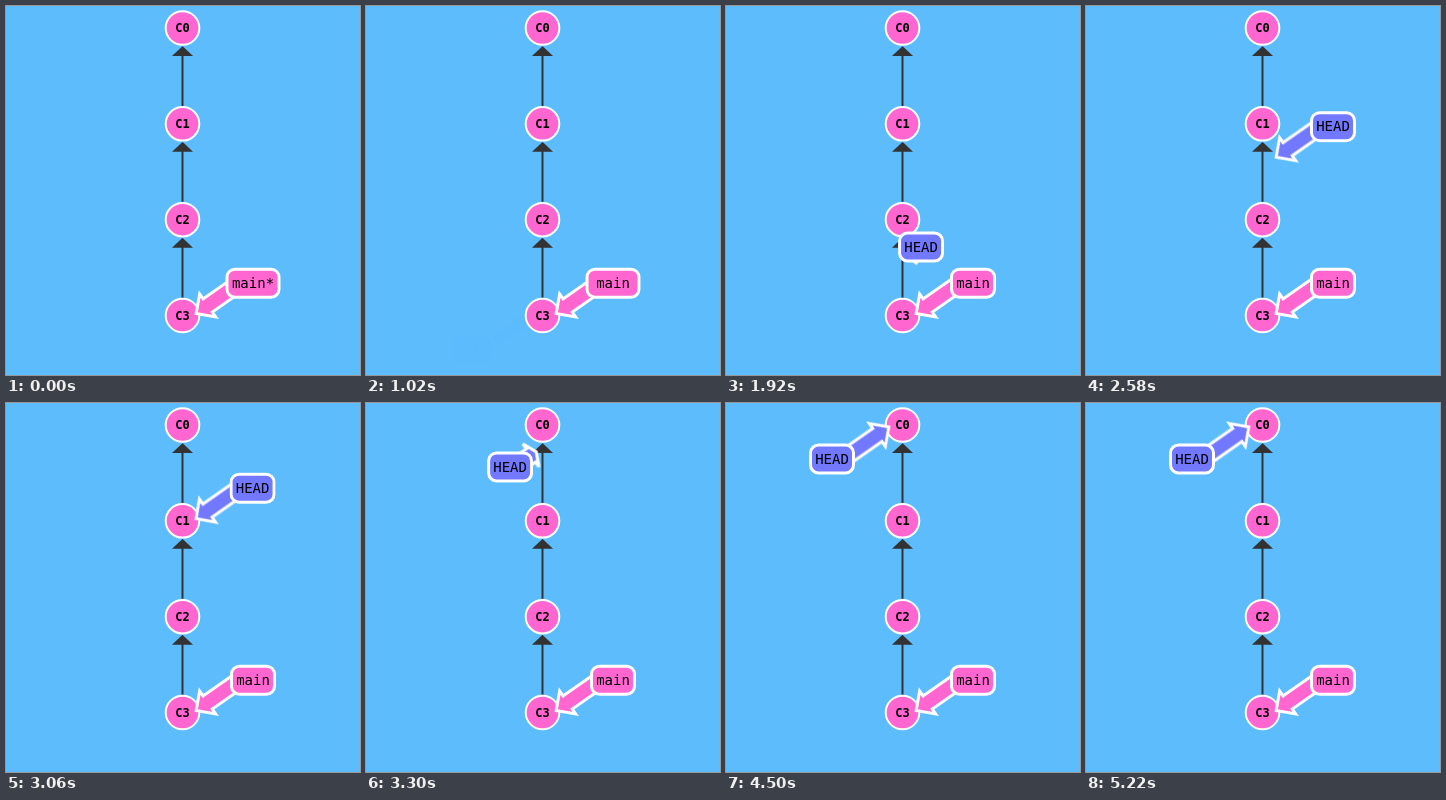
Recreate the animation shown at these times as an HTML page. Size 354x369 px, loop 5280 ms.

```html
<!DOCTYPE html>
<html lang="en">
<head>
<meta charset="utf-8">
<title>Detached HEAD walking up the commits</title>
<style>
  html, body { margin: 0; width: 100%; height: 100%; overflow: hidden; background: #5cbcfc; }
  svg { display: block; width: 354px; height: 369px; }

  text { font: 14px "DejaVu Sans Mono", monospace; text-anchor: middle; fill: #000; }
  .commit circle { fill: #ff66d0; stroke: #fff; stroke-width: 2; }
  .commit text { font-size: 12px; font-weight: bold; }
  .edge { fill: #333; stroke: #333; stroke-width: 2; }

  .ref { stroke: #fff; stroke-width: 3; }
  .ref text { stroke: none; }
  .main { fill: #ff66d0; }
  .head { fill: #7278ff; }

  .arrow { d: path("M31.5 -8 L-17.5 -8 L-17.5 -14 L-31.5 0 L-17.5 14 L-17.5 8 L31.5 8 Z"); }

  .head, .head *, .main rect { animation: 5280ms ease-in-out infinite both; }
  .head { animation-name: appear; }
  .head .label { animation-name: label-move; }
  .head .pointer { animation-name: pointer-move; }
  .head .arrow { animation-name: arrow-flip; }
  .main rect { animation-name: shrink; }
  .starred { animation: starred 5280ms step-end infinite; }
  .plain { animation: plain 5280ms step-end infinite; }

  /* 18.845% = checkout, then one step up at 32.008%, 44.508% and 57.67% */
  @keyframes appear {
    0%, 18.845% { opacity: 0; }
    26.42%, 100% { opacity: 1; }
  }
  @keyframes shrink {
    0%, 18.845% { x: -26px; width: 52px; }
    26.42%, 100% { x: -21.5px; width: 43px; }
  }
  @keyframes starred { 0% { opacity: 1; } 18.845%, 100% { opacity: 0; } }
  @keyframes plain { 0% { opacity: 0; } 18.845%, 100% { opacity: 1; } }

  @keyframes label-move {
    0%, 32.008% { transform: translate(106px, 343.5px); }
    39.583%, 44.508% { transform: translate(247px, 181.2px); }
    52.083%, 57.67% { transform: translate(247px, 85.3px); }
    65.246%, 100% { transform: translate(106px, 56px); }
  }
  @keyframes pointer-move {
    0%, 32.008% { transform: translate(137px, 329.5px) rotate(-35deg); }
    39.583%, 44.508% { transform: translate(216px, 193.7px) rotate(-35deg); }
    52.083%, 57.67% { transform: translate(216px, 97.8px) rotate(-35deg); }
    65.246%, 100% { transform: translate(137px, 42px) rotate(-35deg); }
  }
  @keyframes arrow-flip {
    0%, 32.008%, 65.246%, 100% {
      d: path("M-31.5 -8 L17.5 -8 L17.5 -14 L31.5 0 L17.5 14 L17.5 8 L-31.5 8 Z");
    }
    39.583%, 57.67% {
      d: path("M31.5 -8 L-17.5 -8 L-17.5 -14 L-31.5 0 L-17.5 14 L-17.5 8 L31.5 8 Z");
    }
  }
</style>
</head>
<body>
<svg viewBox="0 0 354 369">
  <defs>
    <path id="edge" class="edge" d="M0 19.5 L8 27 H-8 Z M0 27 V78"/>
  </defs>

  <use href="#edge" x="176.5" y="22"/>
  <use href="#edge" x="176.5" y="117.8"/>
  <use href="#edge" x="176.5" y="213.7"/>

  <g class="commit" transform="translate(176.5 22)"><circle r="16.8"/><text y="4.4">C0</text></g>
  <g class="commit" transform="translate(176.5 117.8)"><circle r="16.8"/><text y="4.4">C1</text></g>
  <g class="commit" transform="translate(176.5 213.7)"><circle r="16.8"/><text y="4.4">C2</text></g>
  <g class="commit" transform="translate(176.5 309.5)"><circle r="16.8"/><text y="4.4">C3</text></g>

  <g class="ref main">
    <g transform="translate(216 289.5) rotate(-35)"><path class="arrow"/></g>
    <g transform="translate(247 277.2)">
      <rect x="-26" y="-14" width="52" height="28" rx="8"/>
      <text class="starred" y="4.8">main*</text>
      <text class="plain" y="4.8">main</text>
    </g>
  </g>

  <g class="ref head">
    <g class="pointer"><path class="arrow"/></g>
    <g class="label">
      <rect x="-21.5" y="-14" width="43" height="28" rx="8"/>
      <text y="4.8">HEAD</text>
    </g>
  </g>
</svg>
</body>
</html>
```
